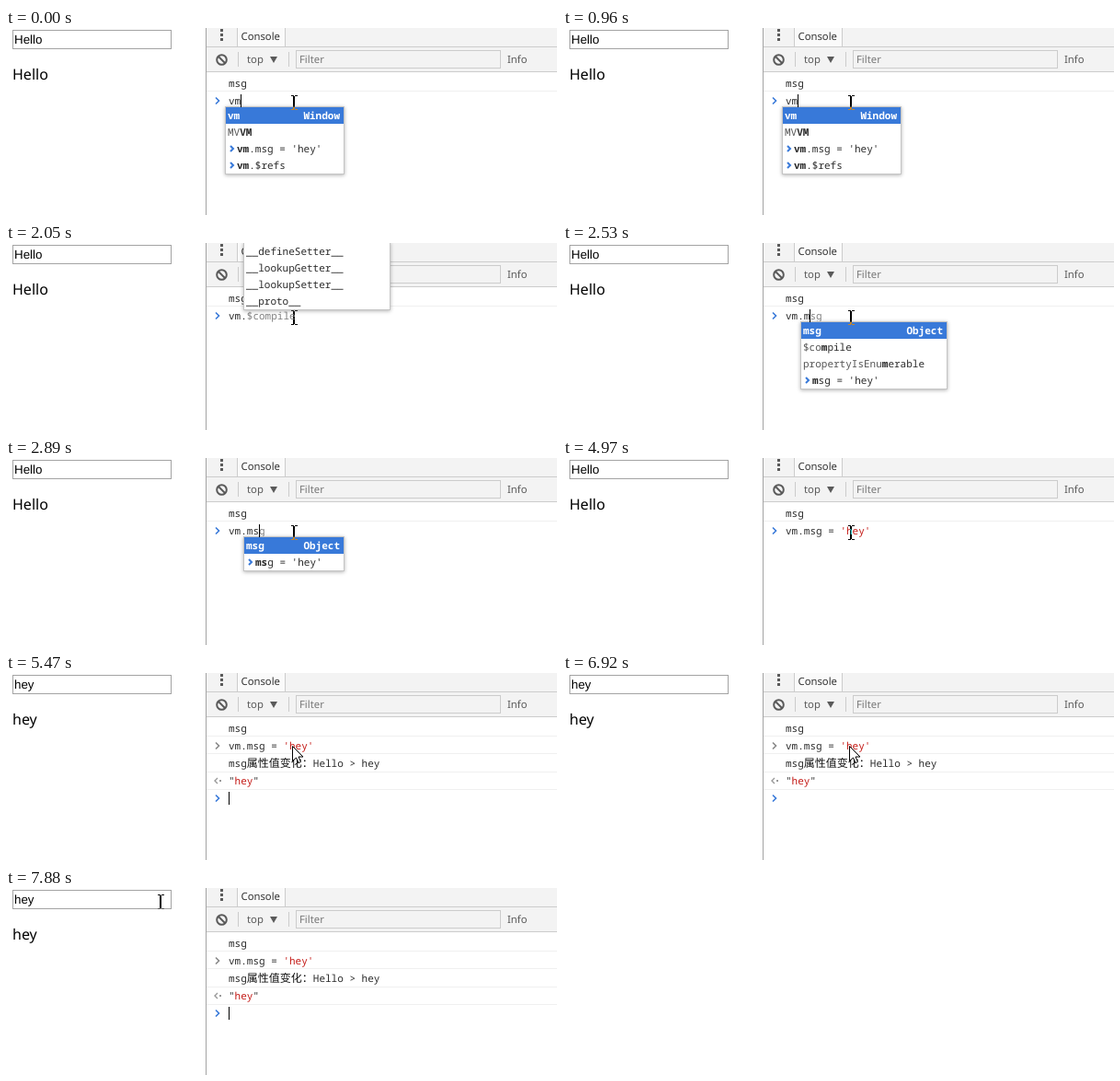
Animation of 599x203 px, one loop 7.99 s. Source, as an HTML page with a canvas:

```html
<!DOCTYPE html>
<html lang="en">
<head>
<meta charset="utf-8">
<title>Console data binding</title>
<style>
html, body { margin: 0; width: 100%; height: 100%; overflow: hidden; background: #fff; }
canvas { display: block; }
</style>
</head>
<body>
<canvas id="stage" width="599" height="203"></canvas>
<script>
const ctx = document.getElementById('stage').getContext('2d');
ctx.textRendering = 'geometricPrecision';

const LOOP = 7990;
const MONO = '11px "Noto Sans Mono", monospace';
const BOLD = 'bold ' + MONO;
const CJK = '12px "Noto Sans CJK SC", "Noto Sans CJK", sans-serif';
const UI = '11.3px "Noto Sans", sans-serif';
const FIELD = '13.33px "Liberation Sans", sans-serif';
const BODY = '16px "Noto Sans", sans-serif';
const INK = '#2b2b2b', GHOST = '#808080', RED = '#c41a16', BLUE = '#3879d9';

function rect(x, y, w, h, color) {
  ctx.fillStyle = color;
  ctx.fillRect(x, y, w, h);
}

function frame(x, y, w, h, color) {
  ctx.strokeStyle = color;
  ctx.lineWidth = 1;
  ctx.strokeRect(x + .5, y + .5, w - 1, h - 1);
}

function text(str, x, y, font, color) {
  ctx.font = font;
  ctx.fillStyle = color;
  ctx.fillText(str, x, y);
  return x + ctx.measureText(str).width;
}

// Draws [string, color, font] pieces one after another.
function runs(x, y, ...pieces) {
  for (const [str, color = INK, font = MONO] of pieces) x = text(str, x, y, font, color);
}

function line(points, color, width) {
  ctx.strokeStyle = color;
  ctx.lineWidth = width;
  ctx.beginPath();
  points.forEach(([x, y]) => ctx.lineTo(x, y));
  ctx.stroke();
}

function chevron(x, y, color, width = 1.6, size = 3.5) {
  line([[x, y - size], [x + size, y], [x, y + size]], color, width);
}

function page(value) {
  frame(7, 2, 173, 21, '#a3a3a3');
  text(value, 9, 17, FIELD, '#000');
  text(value, 7, 56, BODY, '#000');
}

function toolbar() {
  rect(217, 0, 1, 203, '#a3a3a3');
  rect(218, 0, 381, 48, '#f3f3f3');
  rect(218, 20, 381, 1, '#cccccc');
  rect(218, 47, 381, 1, '#cccccc');
  rect(251, 0, 53, 20, '#fafafa');
  rect(251, 0, 1, 20, '#cccccc');
  rect(303, 0, 1, 20, '#cccccc');
  for (const y of [1, 6, 11]) rect(233, y, 3, 3, '#5a5a5a');
  text('Console', 255.5, 13, UI, '#333');

  ctx.strokeStyle = '#5a5a5a';
  ctx.lineWidth = 2;
  ctx.beginPath();
  ctx.arc(234.5, 34.5, 5.3, 0, 2 * Math.PI);
  ctx.stroke();
  line([[231, 31], [238, 38]], '#5a5a5a', 2);

  rect(252, 26, 1, 16, '#cccccc');
  rect(307, 26, 1, 16, '#cccccc');
  text('top', 262, 38, UI, '#5a5a5a');
  ctx.beginPath();
  ctx.moveTo(287, 31);
  ctx.lineTo(295, 31);
  ctx.lineTo(291, 38);
  ctx.fill();
  frame(315, 24, 223, 20, '#cccccc');
  text('Filter', 319, 38, UI, '#777');
  text('Info', 545, 38, UI, '#5a5a5a');
}

function separator(y) {
  rect(218, y, 381, 1, '#f0f0f0');
}

// Each row: { parts: [before, match, after], history, note }
function popup(x, y, right, rows, selected) {
  const height = rows.length * 18;
  ctx.save();
  ctx.shadowColor = 'rgba(0,0,0,.3)';
  ctx.shadowBlur = 4;
  ctx.shadowOffsetY = 1;
  rect(x, y - 1, right - x + 1, height + 2, '#fff');
  ctx.restore();
  frame(x, y - 1, right - x + 1, height + 2, '#c4c4c4');
  rows.forEach(({ parts, history, note }, i) => {
    const top = y + i * 18, on = i === selected;
    if (on) rect(x + 1, top, right - x - 1, 18, BLUE);
    const ink = on ? '#fff' : INK;
    const plain = on ? BOLD : MONO;
    if (history) chevron(x + 6, top + 9, on ? '#fff' : BLUE, 2, 3);
    runs(x + (history ? 13 : 3), top + 13,
      [parts[0], on ? '#fff' : '#555', plain], [parts[1], ink, BOLD], [parts[2], ink, plain]);
    if (note) {
      ctx.textAlign = 'right';
      text(note, right - 4, top + 13, plain, on ? '#fff' : '#999');
      ctx.textAlign = 'left';
    }
  });
}

const item = (before, match, after, extra) => ({ parts: [before, match, after], ...extra });
const history = { history: true };

const vmRows = [
  item('', 'vm', '', { note: 'Window' }),
  item('MV', 'VM', ''),
  item('', 'vm', ".msg = 'hey'", history),
  item('', 'vm', '.$refs', history)
];
const memberRows = ['__defineSetter__', '__lookupGetter__', '__lookupSetter__', '__proto__']
  .map(name => item('', '', name));
const mRows = [
  item('', 'm', 'sg', { note: 'Object' }),
  item('$co', 'm', 'pile'),
  item('propertyIsEnu', 'm', 'erable'),
  item('', 'm', "sg = 'hey'", history)
];
const msRows = [
  item('', 'ms', 'g', { note: 'Object' }),
  item('', 'ms', "g = 'hey'", history)
];

// Prompt states: typed text, greyed completion, caret x, popup arguments.
const prompts = [
  { at: 0, typed: 'vm', caret: 255, list: [238, 86, 367, vmRows, 0] },
  { at: 1430, typed: 'vm.', ghost: '$compile', caret: 262, list: [258, 0, 417, memberRows, -1] },
  { at: 2530, typed: 'vm.m', ghost: 'sg', caret: 268, list: [258, 86, 417, mRows, 0] },
  { at: 2890, typed: 'vm.ms', ghost: 'g', caret: 275, list: [258, 86, 367, msRows, 0] },
  { at: 4220, typed: 'vm.ms', ghost: "g = 'hey'", caret: 275, list: [258, 86, 367, msRows, 1] },
  { at: 4470, typed: 'vm.msg = ', string: "'hey'", caret: 334 },
  { at: 5470, caret: 242, done: true }
];
const caretOff = [[370, 960], [2050, 2530], [3480, 3970], [4970, 5470], [5960, 6460], [6920, 7390]];

const pointers = [
  { at: 0, x: 313, y: 80, beam: true },
  { at: 5470, x: 311, y: 79 },
  { at: 7270, x: 331, y: 84 },
  { at: 7390, x: 318, y: 70 },
  { at: 7510, x: 262, y: 44 },
  { at: 7640, x: 205, y: 26 },
  { at: 7760, x: 176, y: 15, beam: true },
  { at: 7880, x: 168, y: 14, beam: true }
];

const current = (steps, t) => steps.filter(s => s.at <= t).pop();

function pointer({ x, y, beam }) {
  if (beam) {
    // The text cursor inverts whatever is below it.
    ctx.globalCompositeOperation = 'difference';
    rect(x - 3, y - 7, 3, 1, '#fff');
    rect(x + 1, y - 7, 3, 1, '#fff');
    rect(x, y - 6, 1, 14, '#fff');
    rect(x - 1, y - 6, 1, 14, '#fff');
    rect(x - 3, y + 8, 3, 1, '#fff');
    rect(x + 1, y + 8, 3, 1, '#fff');
    ctx.globalCompositeOperation = 'source-over';
    return;
  }
  const shape = [[0, 0], [0, 16], [4, 12.5], [6.5, 18], [9, 17], [6.5, 11.5], [11.5, 11.5]];
  ctx.beginPath();
  shape.forEach(([dx, dy]) => ctx.lineTo(x + .5 + dx, y + .5 + dy));
  ctx.closePath();
  ctx.fillStyle = '#fff';
  ctx.fill();
  ctx.strokeStyle = '#000';
  ctx.lineWidth = 1;
  ctx.stroke();
}

function results() {
  chevron(228, 79, '#888');
  runs(242, 83, ['vm.msg = '], ["'hey'", RED]);
  separator(87);
  runs(242, 102, ['msg'], ['属性值变化：', '#111', CJK], ['Hello > hey']);
  separator(107);
  line([[230, 114], [227, 117], [230, 120]], '#999', 1.4);
  rect(232, 116, 2, 2, '#999');
  runs(242, 121, ['"'], ['hey', RED], ['"']);
  separator(126);
  chevron(228, 136, BLUE);
}

function draw(t) {
  const { typed, ghost = '', string = '', caret, list, done } = current(prompts, t);
  rect(0, 0, 599, 203, '#fff');
  page(done ? 'hey' : 'Hello');
  toolbar();
  runs(242, 64, ['msg']);
  separator(68);
  if (done) {
    results();
  } else {
    chevron(228, 79, BLUE);
    runs(242, 83, [typed], [string, RED], [ghost, GHOST]);
  }
  if (list) popup(...list);
  const hidden = caretOff.some(([from, to]) => t >= from && t < to);
  if (!hidden) rect(caret, done ? 129 : 72, 1, 14, '#000');
  pointer(current(pointers, t));
}

const start = performance.now();
function tick() {
  draw((performance.now() - start) % LOOP);
  requestAnimationFrame(tick);
}
tick();
</script>
</body>
</html>
```
